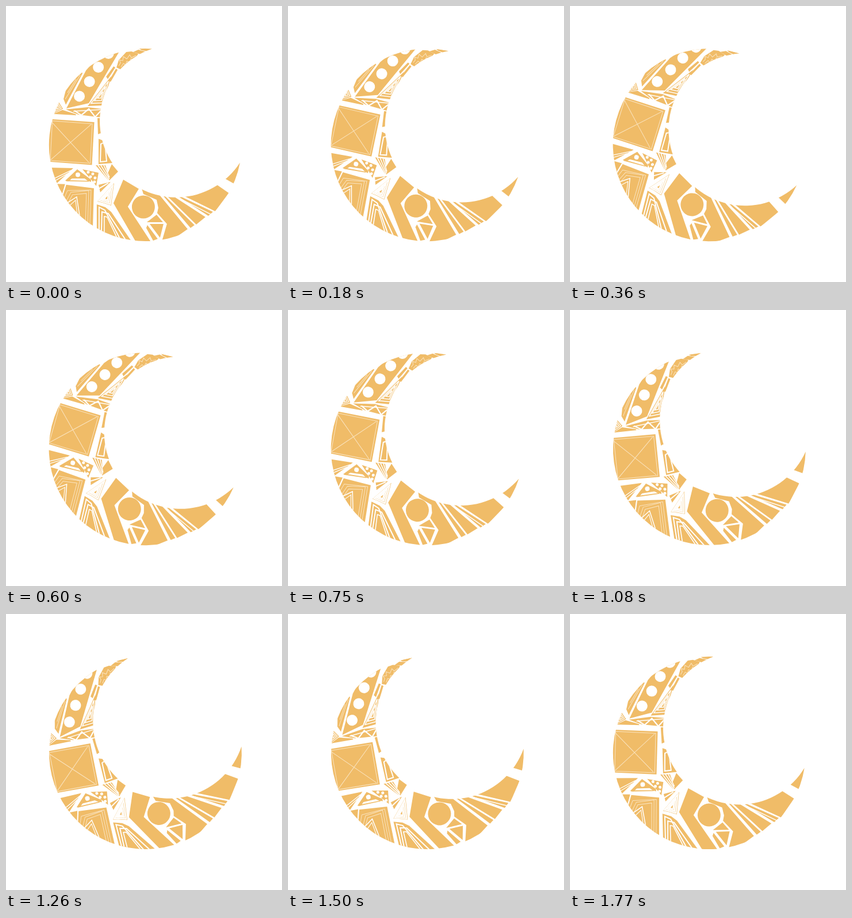
These frames come from a looping animation (480 by 480 pixels, 1800 ms). An HTML page:

```html
<!DOCTYPE html>
<html lang="en">
<head>
<meta charset="utf-8">
<title>Swaying moon</title>
<style>
html, body { margin: 0; width: 100%; height: 100%; overflow: hidden; background: #fff; }
svg { display: block; width: 100vw; height: 100vh; }
.gold { fill: #f0bc68; }
.cut { fill: none; stroke: #fff; stroke-width: 2; }
.fine { fill: none; stroke: #fae4c0; stroke-width: 1; }
.hole { fill: #fff; }
</style>
</head>
<body>
<svg viewBox="0 0 480 480">
  <defs>
    <clipPath id="crescent">
      <path d="M254 74.5A167.5 167.5 0 1 0 407 272A132.5 132.5 0 1 1 254 74.5Z"/>
    </clipPath>
  </defs>
  <g id="moon"><g id="art" clip-path="url(#crescent)"></g></g>
</svg>
<script>
const NS = "http://www.w3.org/2000/svg";
const art = document.getElementById("art");
const moon = document.getElementById("moon");

function add(tag, cls, attrs) {
  const el = document.createElementNS(NS, tag);
  el.setAttribute("class", cls);
  for (const key in attrs) el.setAttribute(key, attrs[key]);
  art.append(el);
}
const gold = d => add("path", "gold", { d });
const cut = (d, w = 2) => add("path", "cut", { d, style: `stroke-width:${w}` });
const fine = d => add("path", "fine", { d });
const dot = (cx, cy, r, cls = "hole") => add("circle", cls, { cx, cy, r });
const outline = points => "M" + points.map(p => p.join(" ")).join("L") + "Z";

// Concentric outlines that shrink toward the middle of a polygon.
function rings(points, scales, draw, w) {
  const mid = [0, 1].map(i => points.reduce((sum, p) => sum + p[i], 0) / points.length);
  for (const k of scales) {
    draw(outline(points.map(p => p.map((v, i) => mid[i] + (v - mid[i]) * k))), w);
  }
}

// Upper tip
gold("M228 72L258 72L246 79L236 77Z");
gold("M221 80L230 76L245 80L234 84Z");
gold("M192 107L196 94L209 80L218 79L230 83L224 92L201 111Z");
fine("M196 104L199 99L197 94L203 95L204 88L210 92L215 85L218 90L226 86");
fine("M200 106L204 100L208 102L210 96L215 98L217 92L222 94");

// Dotted band
gold("M105 178L139 112L160 88L197 79L144 169Z");
[[127.5, 157], [145, 131.5], [160.5, 106.5], [178, 82.5]].forEach(([x, y]) => dot(x, y, 9.5));
gold("M100 162L106 138L131 114L133 117L104 172Z");
fine("M103 162L129 120M107 151L122 127");
gold("M83 187L89 163L99 179Z");
rings([[83, 187], [89, 163], [99, 179]], [.68, .3], cut, 1.2);

// Stripes beside the band
const fan = [[142, 174], [183, 122], [168, 173]];
gold(outline(fan));
rings(fan, [.74, .48, .22], cut, 1.5);
gold("M174 123L187 105L190 107L177 127Z");
gold("M179 130L191 109L194 111L182 132Z");

// Zigzag row
gold("M82 188L98 181L121 188L122 190Z");
gold("M104 180L142 176L167 179L167 194L126 189Z");
cut("M119 182L131 190L144 179L155 193L167 180", 2.2);
cut("M117 183L168 180", 1.5);

// Crossed square
gold("M79 197L153.5 202L149.5 276.5L60 270L60 197Z");
fine("M80.5 200L150 205L146.5 273.5L77 269ZM80.5 203L144 272M148 206L78 267.5");

// Slivers along the inner edge
gold("M159 195L167 195L168 220L160 223Z");
gold("M161 231L169 234L186 262L186 273L161 275Z");
cut("M165 240L172 237L175 270L164 271Z", 2);
gold("M184 275L195 288L180 303L177 291Z");
gold("M156 277L173 277L181 303L177 302Z");
cut("M160 277L179 303M165 277L180 301M170 277L180 298", 1.6);

// Row under the square
gold("M70 281L117 282L88 309L70 309Z");
cut("M80 302L113 286M82 306L108 291", 1.3);
gold("M103 304L124 284L148 302L148 306L142 304L125 291L109 305Z");
gold("M113 300L125 289L138 300Z");
dot(125, 293.5, 4);
gold("M133 284L161 290L157 313L150 304Z");
[[143, 289], [151, 292], [147, 297], [155, 299], [154, 306]].forEach(([x, y]) => dot(x, y, 2.5));
gold("M108 303L144 304L144 305.5L104 305Z");

// Lower left block
gold("M70 309L103 310L95 340L70 340Z");
gold("M104 311L153 317L151 390L90 380L95 336Z");
cut("M104 310L96 336", 2);
fine("M107 321L148 320L146 380M107 321L99 340");
rings([[113, 324], [144, 321], [142, 385], [102, 345]], [1, .78], fine);
cut("M106 343L123 332L128 364", 1.5);
cut("M111 347L121 338L124 362", 1.1);

// Nested shards
const shard = [[159, 340], [188, 308], [183, 347], [168, 342]];
gold(outline(shard));
rings(shard, [.82, .54, .28], cut, 2.4);
gold("M161 311L182 306L164 324Z");
cut("M161 318L178 308", 2);
gold("M158 345L173 350L183 358L219 410L158 395Z");
cut("M162 395L162 350L172 355L200 408", 2);
cut("M166 395L167 358L178 361L209 408", 2);
cut("M171 395L171 366L176 367L194 405", 1.6);

// Chevron, ringed disc and hourglass
gold("M204 302L231 318L212 349L252 410L227 412L187 343Z");
gold("M236 317L264 325L316 388L296 402L271 410L280 379L263 360L265 351L262 337L239 327Z");
dot(239, 349.5, 20, "gold");
gold("M245 376L262 363L273 376Z");
gold("M250 379L274 379L268 403Z");
gold("M246 381L264 405L256 408L244 386Z");

// Rays
gold("M270 326L273 327L328 381L321 386Z");
gold("M279 329L290 330L347 367L331 380Z");
gold("M296 329L301 330L360 358L352 365Z");
cut("M291 329L356 362", 1.5);
gold("M307 329L340 318L367 311L387.5 325L364 357Z");
gold("M381 300L410 268L397 309Z");

const PERIOD = 1800;
const SWING = 15;
const start = performance.now();

function frame(now) {
  const t = Math.max(0, now - start) % PERIOD;
  const angle = SWING * Math.sin(2 * Math.PI * t / PERIOD);
  moon.setAttribute("transform", `rotate(${angle.toFixed(3)} 242 241)`);
  requestAnimationFrame(frame);
}
frame(start);
</script>
</body>
</html>
```
